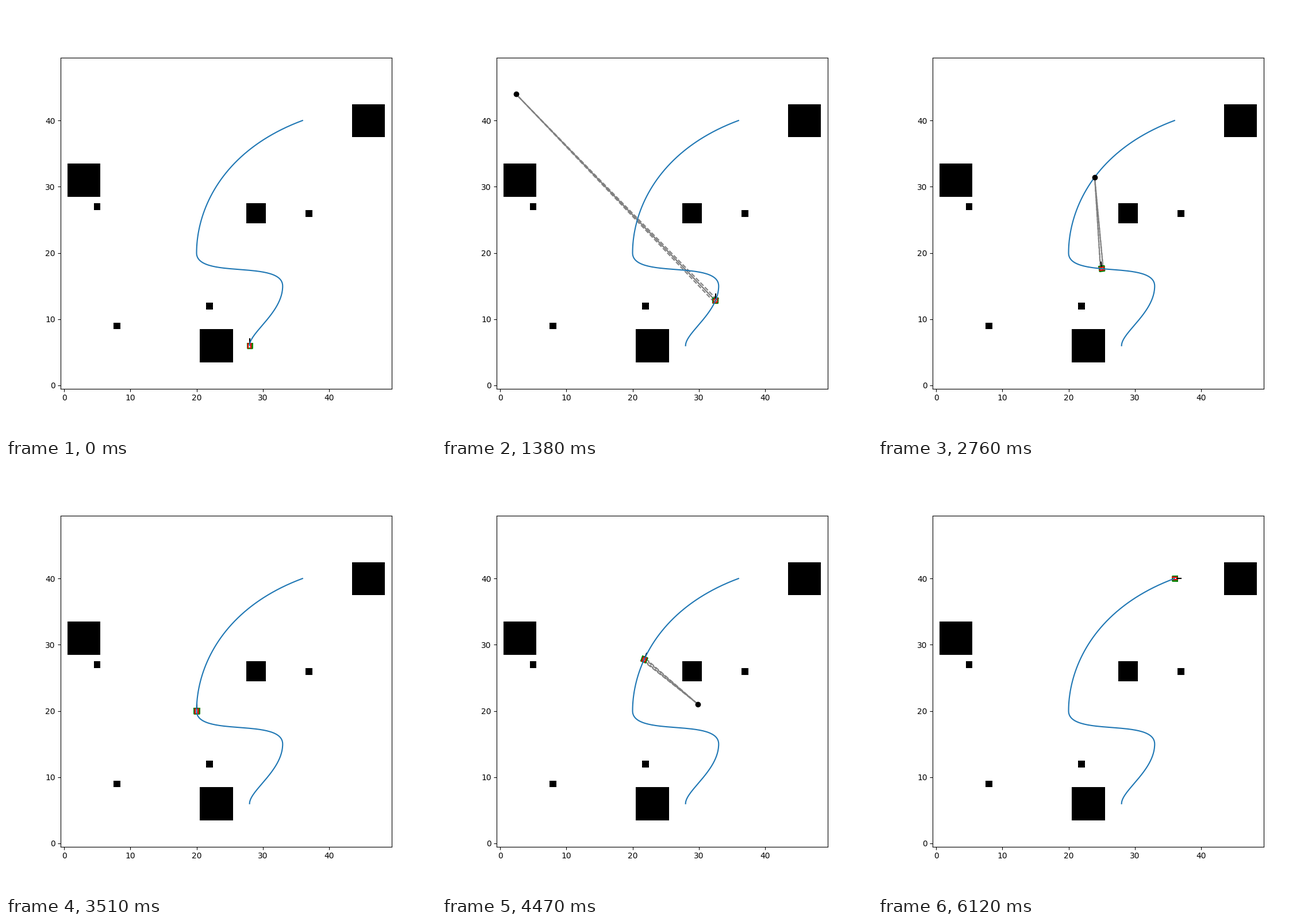
A matplotlib script that plays this animation: 748x748 px, repeating every 6150 ms.

```python
import numpy as np
import matplotlib.pyplot as plt
from matplotlib.animation import FuncAnimation

INTERVAL = 30

# Legs: frame count, Bezier control points, vertical drive-velocity controls
LEGS = [
    (58, [(28, 6), (28, 8), (33, 11), (33, 15)], (2.27, -1.34, 2.82)),
    (60, [(33, 15), (33, 19), (20, 16), (20, 20)], (5.5, -5.42, 3.5)),
    (87, [(20, 20), (20, 26.67), (24, 35.55), (36, 40)], (7, 2.6, 0.3)),
]
FRAMES = sum(leg[0] for leg in LEGS)

# Turn rate and heading (degrees) along each leg, for u from 0 to 1
SPIN = [
    lambda u: -0.16 * np.sin(2 * np.pi * u),
    lambda u: 960 * u**2.75 * (0.49 - u) * (1 - u)**3,
    lambda u: -2.39 * u**0.45 * (1 - u**12),
]
HEADING = [
    lambda u: 90 - 6 * np.sin(np.pi * u)**2,
    lambda u: 90 + 8 * np.sin(np.pi * u)**2,
    lambda u: 90 - 90 * u**1.4,
]

# Obstacles: centre x, centre y, half size in cells
BLOCKS = [(23, 6, 2), (3, 31, 2), (46, 40, 2), (29, 26, 1),
          (5, 27, 0), (37, 26, 0), (22, 12, 0), (8, 9, 0)]

SQUARE = np.array([(1, 1), (1, -1), (-1, -1), (-1, 1)])


def bezier(points, u):
    p = np.asarray(points, float)
    u = np.asarray(u, float)[..., None]
    v = 1 - u
    return v**3 * p[0] + 3 * u * v**2 * p[1] + 3 * u**2 * v * p[2] + u**3 * p[3]


def velocity(points, ctrl_y, u):
    d = np.diff(np.asarray(points, float), axis=0)
    d[:, 1] = ctrl_y
    return 3 * ((1 - u)**2 * d[0] + 2 * u * (1 - u) * d[1] + u**2 * d[2])


def state(i):
    """Position, heading and turning centre (None at rest) at frame i."""
    leg = 0
    while i >= LEGS[leg][0]:
        i -= LEGS[leg][0]
        leg += 1
    count, points, ctrl_y = LEGS[leg]
    u = i / (count - 1)
    pos = bezier(points, u)
    spin = SPIN[leg](u)
    centre = None
    if abs(spin) > 1e-6:
        vx, vy = velocity(points, ctrl_y, u)
        centre = pos + np.array([-vy, vx]) / spin
    return pos, np.radians(HEADING[leg](u)), centre


def set_line(line, *points):
    line.set_data(*np.array(points).T)


fig = plt.figure(figsize=(7.48, 7.48), dpi=100)
ax = fig.add_subplot()

grid = np.ones((50, 50))
for x, y, h in BLOCKS:
    grid[y - h:y + h + 1, x - h:x + h + 1] = 0
ax.imshow(grid, cmap="gray", origin="lower", vmin=0, vmax=1)
ax.set_autoscale_on(False)

path = np.vstack([bezier(leg[1], np.linspace(0, 1, leg[0])) for leg in LEGS])
ax.plot(*path.T, color="C0", lw=1.5, zorder=6)


def new_line(color, z, lw=1.5, style="-"):
    return ax.plot([], [], style, color=color, lw=lw, zorder=z)[0]


axles = [new_line("gray", 2, style="--") for _ in SQUARE]
body = new_line("green", 3, lw=2)
wheels = [new_line("red", 4) for _ in SQUARE]
nose = new_line("black", 5)
pivot, = ax.plot([], [], "ko", ms=6, zorder=7)


def draw(i):
    pos, theta, centre = state(i)
    ahead = np.array([np.cos(theta), np.sin(theta)])
    side = np.array([-ahead[1], ahead[0]])
    corners = SQUARE @ np.array([ahead, side])
    hubs = pos + 0.2 * corners

    outline = pos + 0.36 * corners
    set_line(body, *outline, outline[0], outline[1])
    set_line(nose, pos + 0.4 * ahead, pos + ahead)

    for hub, wheel, axle in zip(hubs, wheels, axles):
        roll = ahead
        if centre is None:
            axle.set_data([], [])
        else:
            arm = centre - hub
            dist = np.hypot(*arm)
            roll = np.array([-arm[1], arm[0]]) / dist
            # Far centres only need the visible stretch
            set_line(axle, hub, hub + arm * min(1, 90 / dist))
        set_line(wheel, hub - 0.15 * roll, hub + 0.15 * roll)

    if centre is None:
        pivot.set_data([], [])
    else:
        set_line(pivot, centre)
    return [body, nose, pivot, *wheels, *axles]


anim = FuncAnimation(fig, draw, frames=FRAMES, interval=INTERVAL,
                     repeat=True, repeat_delay=0, blit=False)
plt.show()
```
